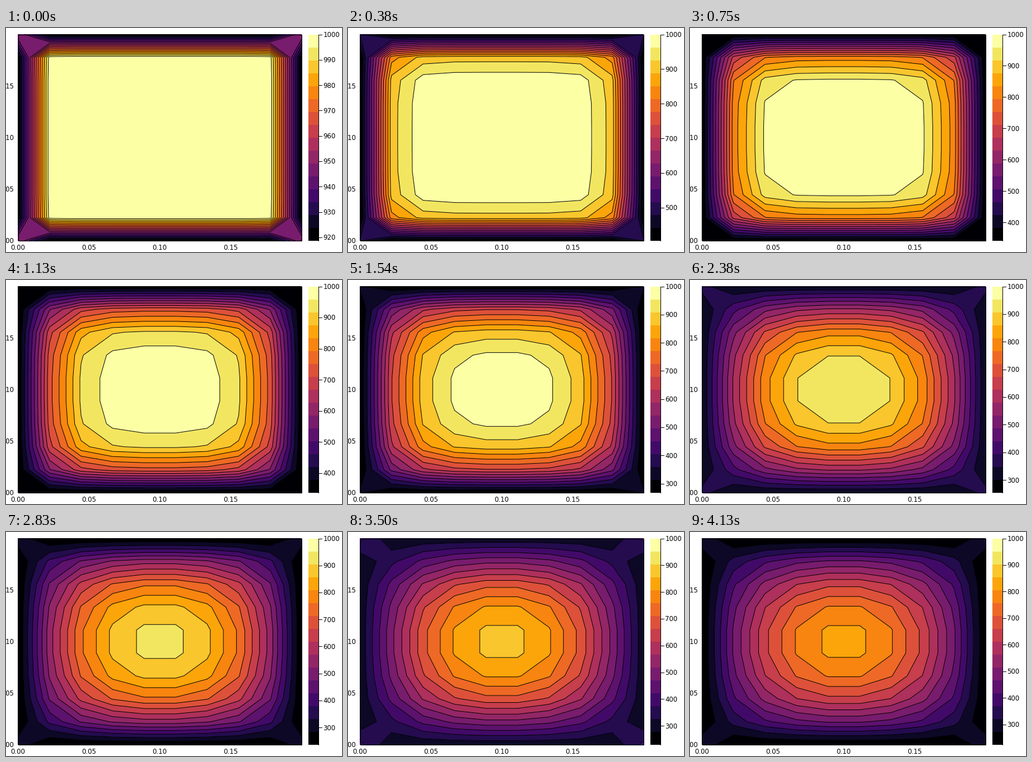
Recreate the animation shown at these times as a matplotlib script. Size 600 px wide and 400 px high, loop 4.18 s.

```python
import numpy as np
import matplotlib.pyplot as plt
from matplotlib.animation import FuncAnimation

W, H, DPI = 600, 400, 100
FRAMES, LOOP_MS = 100, 4180
L, R, T, B = 21.5, 528, 11.5, 379.5    # plot area in pixels
BAR_L, BAR_R = 540, 557.5
N, BANDS, HOT = 10, 16, 1000.0
FOURIER, SUB = 0.0306, 10              # diffusion per frame, substeps
PX = 72 / DPI


def swing(t, low, period):
    return -np.cos(2 * np.pi * (t - low) / period)


def rim(t):
    """Temperature along the sides."""
    d = np.exp(-0.139 * max(t + 1, 0) ** 1.17)
    base = 250 + 38 * np.exp(-0.0336 * (t - 40))
    start = 250 + 38 * np.exp(-0.0336 * -41)
    return base + (HOT - start) * d + 33.3 * (1 - d) * swing(t, 39.5, 30.2)


def corner(t):
    d = np.exp(-0.079 * (t + 1) ** 1.3)
    ramp = 1 - np.exp(-(t / 30) ** 2)
    return 350 + 650 * d + 42 * ramp * swing(t, 34.5, 31)


def simulate():
    u = np.full((N, N), HOT)
    states, lows, low = [], [], HOT
    for k in range(FRAMES):
        for s in range(1, SUB + 1):
            edge = rim(k - 1 + s / SUB)
            u[0], u[-1], u[:, 0], u[:, -1] = edge, edge, edge, edge
            c = u[1:-1, 1:-1]
            lap = u[2:, 1:-1] + u[:-2, 1:-1] + u[1:-1, 2:] + u[1:-1, :-2] - 4 * c
            u[1:-1, 1:-1] = c + FOURIER / SUB * lap
        z = u.copy()
        z[np.ix_([0, -1], [0, -1])] = corner(k)
        low = min(low, z.min())
        states.append(z)
        lows.append(low)
    return states, lows


states, lows = simulate()
colors = plt.get_cmap("inferno")(np.linspace(0, 1, BANDS))
xs, ys = np.linspace(L, R, N), np.linspace(B, T, N)

fig = plt.figure(figsize=(W / DPI, H / DPI), dpi=DPI, facecolor="white")
ax = fig.add_axes([0, 0, 1, 1])
ax.set_xlim(0, W)
ax.set_ylim(H, 0)
ax.axis("off")
ax.set_autoscale_on(False)


def label(x, y, s, ha):
    return ax.text(x, y + 4.4, s, ha=ha, va="baseline", color="black",
                   family="DejaVu Sans", fontsize=11.6 * PX)


def line(x, y):
    return ax.plot(x, y, color="black", lw=PX, zorder=5)[0]


line([L, R, R, L, L], [T, T, B, B, T])
for i in range(4):
    f = i / 4
    label(L + f * (R - L), 392, f"{0.2 * f:.2f}", "center")
    label(14.3, B - f * (B - T), f"{0.2 * f:.2f}", "right")

edges = np.linspace(B, T, BANDS + 1)
for i in range(BANDS):
    ax.fill_between([BAR_L, BAR_R], edges[i], edges[i + 1], color=colors[i],
                    lw=0, antialiased=False)
line([BAR_R, BAR_R], [T, B])

drawn = []


def bar_ticks(low):
    span = HOT - low
    step = next(s for s in (10, 20, 50, 100) if span / s <= 8.5 or s == 100)
    for v in range(int(HOT), int(np.ceil(low)) - 1, -step):
        y = B - (B - T) * (v - low) / span
        drawn.append(line([BAR_R, BAR_R + 6], [y, y]))
        drawn.append(label(566.3, y, str(v), "left"))


def update(k):
    while drawn:
        drawn.pop().remove()
    z, low = states[k], lows[k]
    levels = np.linspace(low, HOT, BANDS + 1)
    inner = levels[1:-1]
    levels[0] -= 1
    levels[-1] += 1
    drawn.append(ax.contourf(xs, ys, z, levels=levels, colors=colors, zorder=1))
    drawn.append(ax.contour(xs, ys, z, levels=inner, colors="black",
                            linewidths=PX, linestyles="solid", zorder=2))
    bar_ticks(low)
    return []


anim = FuncAnimation(fig, update, frames=FRAMES, init_func=lambda: [],
                     interval=LOOP_MS / FRAMES, repeat=True, repeat_delay=0,
                     blit=False)
plt.show()
```
